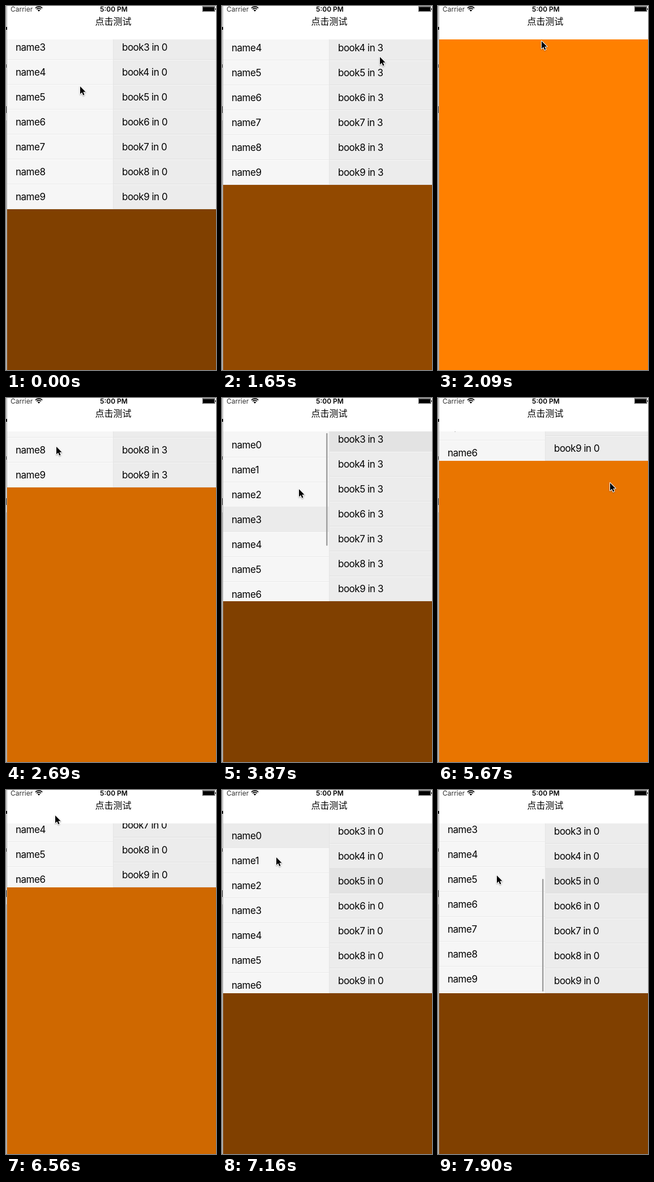
An HTML page with a canvas that plays this animation: 371x643 px, repeating every 8000 ms.

```html
<!DOCTYPE html>
<html lang="zh">
<head>
<meta charset="utf-8">
<title>点击测试</title>
<style>
  html, body { margin: 0; width: 371px; height: 643px; overflow: hidden; background: #fff; }
  canvas { display: block; }
</style>
</head>
<body>
<canvas id="stage" width="371" height="643"></canvas>
<script>
const ctx = document.getElementById('stage').getContext('2d');
const LOOP = 8000, STEP = 148.8;
const TOP = 59, ROW = 44, MENU = 300, LEFT = 2, SPLIT = 189, W = 371, H = 643;
const RANGE = 10 * ROW - MENU;            // scrollable distance
const SANS = 'Inter, "Liberation Sans", sans-serif';
const CJK = '"Noto Sans CJK SC", "Noto Sans CJK", sans-serif';

// What the user does, in ms
const CLOSE = [1565, 5434], OPEN = [2563, 6422], SLIDE = 300;
const FLICK_DOWN = 3201, FLICK_UP = 7504;
const PICK_NAME3 = 450, PICK_BOOK3 = 1565, PICK_NAME0 = 4440, RELOAD = 4700, PICK_BOOK5 = 5434;

// Pointer stops: arrival time, x, y
const stops = [
  [0, 130, 141], [550, 62, 78], [1040, 298, 81], [1339, 288, 79], [1636, 278, 89],
  [2380, 90, 33], [2678, 88, 85], [3201, 118, 96], [3700, 134, 168], [3868, 135, 160],
  [4464, 30, 80], [5208, 303, 149], [6249, 90, 39], [6547, 86, 44],
  [7500, 112, 250], [7886, 103, 150]
];

const clamp = x => Math.min(1, Math.max(0, x));
const ease = x => (x = clamp(x), x * x * (3 - 2 * x));
const between = (t, a, b) => t >= a && t < b;

// Scroll momentum: a damped spring that overshoots a little
function spring(t) {
  const v = Math.max(0, t / 150);
  return 1 - Math.exp(-v) * (Math.cos(v) + Math.sin(v));
}

function menuHeight(t) {
  const sum = list => list.reduce((s, t0) => s + ease((t - t0) / SLIDE), 0);
  return Math.round(MENU * (1 - sum(CLOSE) + sum(OPEN)));
}

const scrollTop = t =>
  Math.round(RANGE * (1 - spring(t - FLICK_DOWN) + spring(t - FLICK_UP)));

// The scroll bar shows during a flick, then fades
const barAlpha = t => [FLICK_DOWN, FLICK_UP].reduce(
  (a, t0) => a + (t < t0 ? 0 : clamp((t0 + 1100 - t) / 300)), 0);

// Each move takes at most 600 ms and ends at its stop
function pointerAt(t) {
  const i = stops.findIndex(s => s[0] > t);
  if (i < 0) return stops[stops.length - 1].slice(1);
  const [t0, x0, y0] = stops[i - 1], [t1, x1, y1] = stops[i];
  const f = ease(1 - (t1 - t) / Math.min(600, t1 - t0));
  return [x0 + (x1 - x0) * f, y0 + (y1 - y0) * f];
}

function rect(color, x, y, w, h) {
  ctx.fillStyle = color;
  ctx.fillRect(x, y, w, h);
}

function text(s, x, y, font, color = '#000', spacing = 0, align = 'left') {
  ctx.font = font;
  ctx.fillStyle = color;
  ctx.letterSpacing = spacing + 'px';
  ctx.textAlign = align;
  ctx.fillText(s, x, y);
}

function list(x, w, pad, y, picked, label, c) {
  rect(c.bg, x, TOP - MENU, w, MENU * 2);
  for (let i = 0; i < 10; i++) {
    const ry = y + i * ROW;
    rect(i === picked ? c.pick : c.line, x, ry + ROW - 1, w, 1);
    rect(c.light, x, ry + ROW, w, 1);
    if (i === picked) rect(c.pick, x, ry, w, ROW);
    text(label(i), x + pad, ry + 28, '17px ' + SANS, '#000', -0.5);
  }
}

function drawMenu(t) {
  const h = menuHeight(t), top = scrollTop(t);
  const shade = 1 - 0.5 * h / MENU;
  rect(`rgb(${Math.round(255 * shade)},${Math.round(128 * shade)},0)`, LEFT, TOP, W, H);
  if (!h) return;

  const group = between(t, PICK_NAME3 + 100, RELOAD) ? 3 : 0;
  const name = t < PICK_NAME3 ? -1 : t < PICK_NAME0 ? 3 : 0;
  const book = between(t, PICK_BOOK3, RELOAD) ? 3 : t >= PICK_BOOK5 ? 5 : -1;

  ctx.save();
  ctx.beginPath();
  ctx.rect(LEFT, TOP, W - LEFT, h);
  ctx.clip();
  ctx.translate(0, h - MENU);           // slides up behind the header
  list(LEFT, SPLIT - LEFT, 15, TOP - top, name, i => 'name' + i,
    { bg: '#f6f6f6', pick: '#ebebeb', line: '#e9e9e9', light: '#fcfcfc' });
  list(SPLIT, W - SPLIT, 16, TOP - RANGE, book, i => `book${i} in ${group}`,
    { bg: '#ececec', pick: '#e3e3e3', line: '#e0e0e0', light: '#f6f6f6' });
  rect('#e5e5e5', SPLIT, TOP, 1, MENU);

  ctx.globalAlpha = barAlpha(t);
  ctx.fillStyle = '#a0a0a0';
  ctx.beginPath();
  ctx.roundRect(184, 62 + 95 * clamp(top / RANGE), 2.5, 199, 1.2);
  ctx.fill();
  ctx.restore();
}

function drawHeader() {
  rect('#fff', 0, 0, W, TOP);
  text('Carrier', 8, 10, '12px ' + SANS, '#333');
  text('5:00 PM', 190.5, 10, '600 12px ' + SANS, '#000', 0, 'center');
  text('点击测试', 189.5, 33, '16px ' + CJK, '#000', 0, 'center');

  ctx.strokeStyle = ctx.fillStyle = '#000';
  ctx.lineWidth = 1.6;
  for (const r of [8.4, 5.4]) {
    ctx.beginPath();
    ctx.arc(58, 9.5, r, -Math.PI * 0.76, -Math.PI * 0.24);
    ctx.stroke();
  }
  ctx.beginPath();
  ctx.moveTo(58, 9.8);
  ctx.arc(58, 9.8, 3.2, -Math.PI * 0.76, -Math.PI * 0.24);
  ctx.fill();

  ctx.lineWidth = 0.6;
  ctx.strokeRect(347.3, 0.8, 21.6, 9);
  rect('#000', 348, 1.6, 20.2, 7.4);
  rect('#000', 370, 4, 1, 3);
}

// Sliver of the window behind
function drawEdge() {
  rect('#e6e6e6', 0, 0, LEFT, 202);
  rect('#b4b4b4', 0, 202, LEFT, H);
  rect('#a8a8a8', 1, 0, 1, H);
  rect('#000', 0, 37, LEFT, 5);
  rect('#555', 0, 103, 1, 6);
  rect('#444', 0, 177, 1, 12);
}

const arrow = new Path2D('M1 1V14.5L4.2 11.6L6.3 16.6L8.5 15.7L6.4 10.8H10.6Z');

function drawPointer(t) {
  const [x, y] = pointerAt(t);
  ctx.save();
  ctx.translate(Math.round(x), Math.round(y));
  ctx.lineJoin = 'round';
  ctx.lineWidth = 2;
  ctx.strokeStyle = '#fff';
  ctx.shadowColor = 'rgba(0,0,0,.35)';
  ctx.shadowBlur = 2;
  ctx.shadowOffsetY = 1;
  ctx.stroke(arrow);
  ctx.shadowColor = 'transparent';
  ctx.fillStyle = '#000';
  ctx.fill(arrow);
  ctx.restore();
}

const start = performance.now();
function frame() {
  const now = (performance.now() - start) % LOOP;
  const t = Math.floor(now / STEP) * STEP;
  drawMenu(t);
  drawHeader();
  drawEdge();
  drawPointer(t);
  requestAnimationFrame(frame);
}
frame();
</script>
</body>
</html>
```
